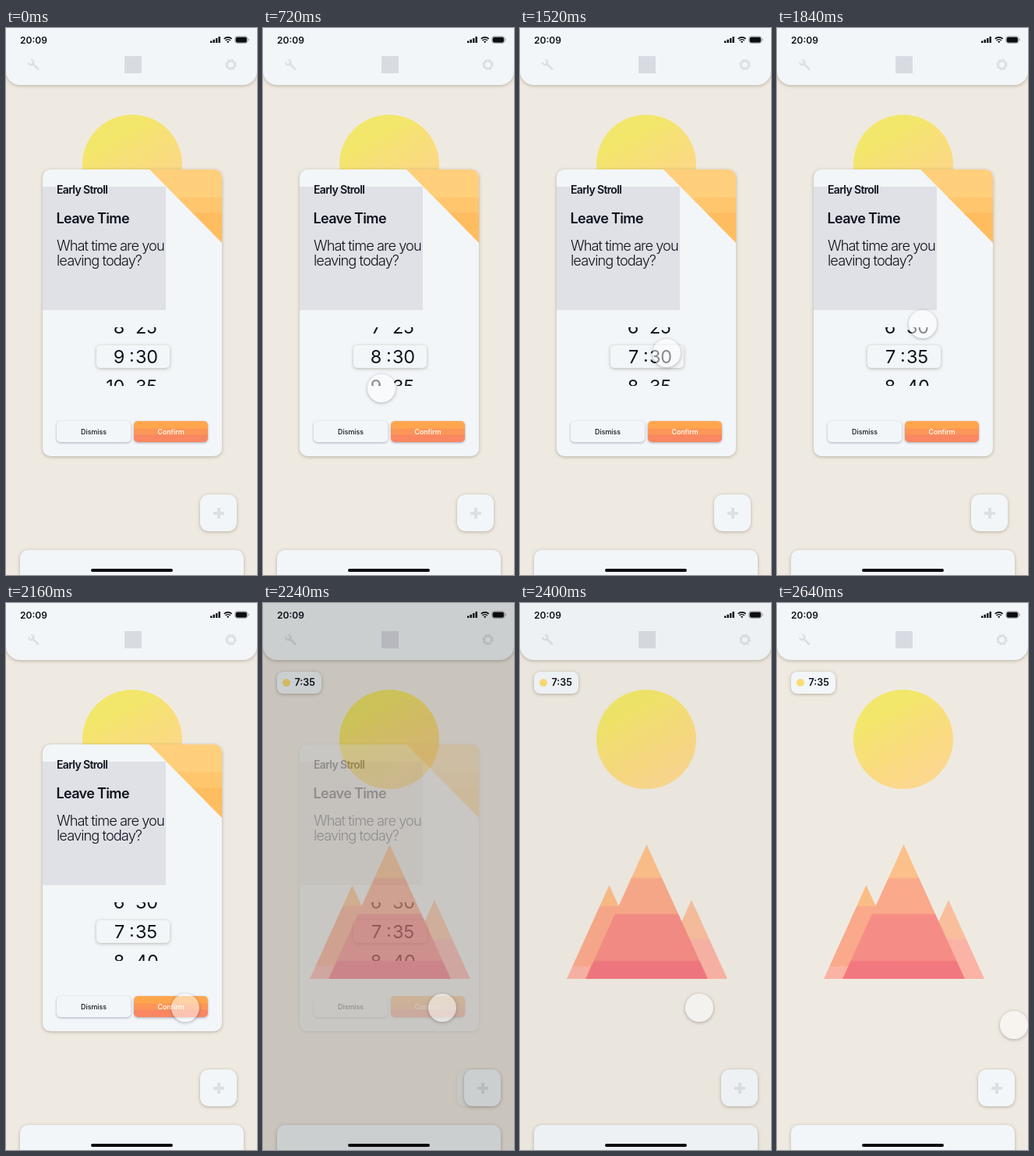
Animation, 322 px wide and 700 px high, one loop 2960 ms. Source, as an HTML page:

```html
<!DOCTYPE html>
<html lang="en">
<head>
<meta charset="utf-8">
<title>Leave time picker</title>
<style>
  html, body { margin: 0; width: 100%; height: 100%; overflow: hidden; }
  body { position: relative; background: #efeae1; color: #10131c; font-family: Inter, sans-serif; }
  div, span, svg { position: absolute; box-sizing: border-box; }
  span { white-space: nowrap; line-height: 20px; font-weight: 600; }
  .panel { background: #f2f6f8; box-shadow: 0 1px 4px rgba(90, 75, 60, .38); }

  #sun { left: 98px; top: 111px; width: 128px; height: 127px; border-radius: 50%;
    background: linear-gradient(150deg, #f2e76a 25%, #f7e076 42%, #fadb80 60%, #fbd88e 82%); }
  .peak { clip-path: polygon(50% 0, 100% 100%, 0 100%); }
  #left { left: 60px; top: 361px; width: 109px; height: 120px;
    background: linear-gradient(#fbbd86 26px, #faa98b 28px 103px, #fbb3a6 105px); }
  #right { left: 174px; top: 380px; width: 92px; height: 101px;
    background: linear-gradient(#f9bf9d 49px, #fbb3a6 51px); }
  #main { left: 84px; top: 309px; width: 157px; height: 172px;
    background: linear-gradient(#fcc08a 42px, #faa98a 44px 88px, #f58d86 90px 148px, #f27880 150px); }

  #header { left: 0; top: 0; width: 322px; height: 73px; border-radius: 0 0 18px 18px; }
  #footer { left: 18px; top: 668px; width: 287px; height: 60px; border-radius: 10px; }
  #home { left: 109px; top: 692px; width: 105px; height: 4px; border-radius: 2px; background: #0c0d12; }
  #mark { left: 152px; top: 36px; width: 22px; height: 22px; background: #d9dbe2; }
  #clock { left: 18px; top: 5.5px; font-size: 12px; }

  .add { top: 597px; width: 47px; height: 47px; border-radius: 11px; }
  .add::before, .add::after { content: ""; position: absolute; left: 16.5px; top: 21.5px;
    width: 14px; height: 4px; border-radius: 1px; background: #dcdfe3; }
  .add::after { transform: rotate(90deg); }

  #pill { left: 18px; top: 88px; width: 57px; height: 28px; border-radius: 8px; }
  #pill div { left: 7px; top: 9px; width: 10px; height: 10px; border-radius: 50%; background: #fbdc74; }
  #pill span { left: 22.5px; top: 4px; font-size: 12.5px; }

  #card { left: 47px; top: 181px; width: 230px; height: 367px; border-radius: 10px; overflow: hidden; }
  #block { left: 0; top: 22px; width: 158px; height: 158px; background: #dfe1e7; }
  #corner { left: 137px; top: 0; width: 93px; height: 94px; clip-path: polygon(0 0, 100% 0, 100% 100%);
    background: linear-gradient(#ffcf7c 37%, #ffc66d 39% 58%, #ffbd60 60%); }
  #app { left: 18px; top: 16px; font-size: 14px; letter-spacing: -.65px; }
  #title { left: 17.5px; top: 52.5px; font-size: 18px; letter-spacing: -.65px; }
  #question { left: 18px; top: 88px; font-size: 18.3px; line-height: 19px; font-weight: 300; letter-spacing: -.95px; }
  .button { top: 322px; width: 95px; height: 27px; border-radius: 5px; text-align: center;
    font: 500 8.8px/27px Inter, sans-serif; box-shadow: 0 1px 3px rgba(60, 70, 110, .4); }
  #dismiss { left: 18px; }
  #confirm { left: 117px; color: #fff; background: linear-gradient(#fea64e 9px, #fb9657 10px 17px, #f88762 18px); }
  #slot { left: 69px; top: 225px; width: 94px; height: 29px; border-radius: 5px; }
  #wheel { left: 69px; top: 202px; width: 100px; height: 75px; overflow: hidden;
    font-size: 23.5px; line-height: 38px; letter-spacing: -.3px; }
  #hours { right: 64px; top: 0; text-align: right; }
  #minutes { left: 50px; top: 0; }
  #colon { left: 42px; top: 17px; }

  #dim { inset: 0; background: #000; }
  #touch { left: -18px; top: -18px; width: 36px; height: 36px; border-radius: 50%;
    background: rgba(255, 255, 255, .5); box-shadow: 0 1px 4px rgba(70, 65, 80, .4); }
</style>
</head>
<body>
<div id="sun"></div>
<div id="left" class="peak"></div>
<div id="right" class="peak"></div>
<div id="main" class="peak"></div>

<div id="header" class="panel"></div>
<div id="mark"></div>
<span id="clock">20:09</span>
<svg width="322" height="73" fill="none">
  <path d="M263.2 19v-2.6M266.7 19v-4.2M270.2 19v-6M273.7 19v-8" stroke="#0c0d12" stroke-width="2.4"/>
  <path d="M279.8 13.9a7 7 0 0 1 9.8 0M281.6 16a4.4 4.4 0 0 1 6.2 0" stroke="#0c0d12" stroke-width="1.6"/>
  <path d="M284.7 19.2l-1.6-1.7a2.3 2.3 0 0 1 3.2 0z" fill="#0c0d12"/>
  <rect x="293.8" y="10.8" width="16" height="8.6" rx="2.6" stroke="#a5a8ad"/>
  <rect x="295" y="12" width="13.6" height="6.2" rx="1.5" fill="#0c0d12" stroke="#0c0d12" stroke-width=".8"/>
  <path d="M311.2 13.6v3" stroke="#a5a8ad" stroke-width="1.2"/>
  <g stroke="#dcdfe3">
    <path d="M34 45.5l7 7" stroke-width="2.6" stroke-linecap="round"/>
    <path d="M32.2 40.8a3.2 3.2 0 1 1-3 3" stroke-width="2.2"/>
    <circle cx="288.5" cy="47" r="5" stroke-width="2.8"/>
    <circle cx="288.5" cy="47" r="6.4" stroke-width="1.6" stroke-dasharray="2.5 2.527"/>
  </g>
</svg>
<div id="footer" class="panel"></div>
<div id="home"></div>

<div class="add panel before" style="left:249px"></div>
<div id="card" class="panel before">
  <div id="block"></div>
  <div id="corner"></div>
  <span id="app">Early Stroll</span>
  <span id="title">Leave Time</span>
  <span id="question">What time are you<br>leaving today?</span>
  <div id="slot" class="panel"></div>
  <div id="wheel">
    <div id="hours">6<br>7<br>8<br>9<br>10</div>
    <div id="colon">:</div>
    <div id="minutes">25<br>30<br>35<br>40</div>
  </div>
  <div id="dismiss" class="button">Dismiss</div>
  <div id="confirm" class="button">Confirm</div>
</div>

<div class="add panel after" style="left:258px"></div>
<div id="pill" class="panel after"><div></div><span>7:35</span></div>
<div id="dim"></div>
<div id="touch"></div>

<script>
const LOOP = 2960, STEP = 80, ROW = 38;
const $ = id => document.getElementById(id);
const each = (selector, apply) => document.querySelectorAll(selector).forEach(apply);

// Each track is a list of [time, value]; values ease between neighbours.
const touchX = [[80, 234], [320, 153], [560, 152], [1280, 152], [1520, 188], [1840, 187], [2080, 230], [2400, 230], [2640, 304]];
const touchY = [[80, 440], [320, 420], [560, 461], [720, 461], [960, 421], [1200, 461], [1280, 461], [1520, 416],
  [1600, 416], [1840, 379], [2080, 518], [2400, 518], [2640, 540]];
const hour = [[320, 9], [560, 8], [960, 8], [1200, 7]];
const minute = [[1600, 30], [1840, 35]];
const cardOpacity = [[2160, 1], [2240, .3], [2320, .05], [2400, 0]];
const dimOpacity = [[2160, 0], [2240, .16], [2320, .05], [2400, .02], [2480, 0]];

function sample(track, t) {
  const next = track.findIndex(([time]) => time > t);
  if (next === 0) return track[0][1];
  if (next < 0) return track[track.length - 1][1];
  const [t0, a] = track[next - 1], [t1, b] = track[next];
  const p = (t - t0) / (t1 - t0);
  return a + (b - a) * p * p * (3 - 2 * p);
}

const scroll = (id, index) => $(id).style.transform = `translateY(${ROW / 2 - index * ROW}px)`;

function draw(now) {
  const t = Math.min(Math.floor(now % LOOP / STEP) * STEP, 2640);
  scroll("hours", sample(hour, t) - 6);
  scroll("minutes", (sample(minute, t) - 25) / 5);
  each(".before", el => el.style.opacity = sample(cardOpacity, t));
  each(".after", el => el.style.opacity = t < 2240 ? 0 : 1);
  $("dim").style.opacity = sample(dimOpacity, t);
  $("touch").style.opacity = t < 80 ? 0 : 1;
  $("touch").style.transform = `translate(${sample(touchX, t)}px, ${sample(touchY, t)}px)`;
}

const start = performance.now();
function tick() {
  draw(performance.now() - start);
  requestAnimationFrame(tick);
}
tick();
</script>
</body>
</html>
```
